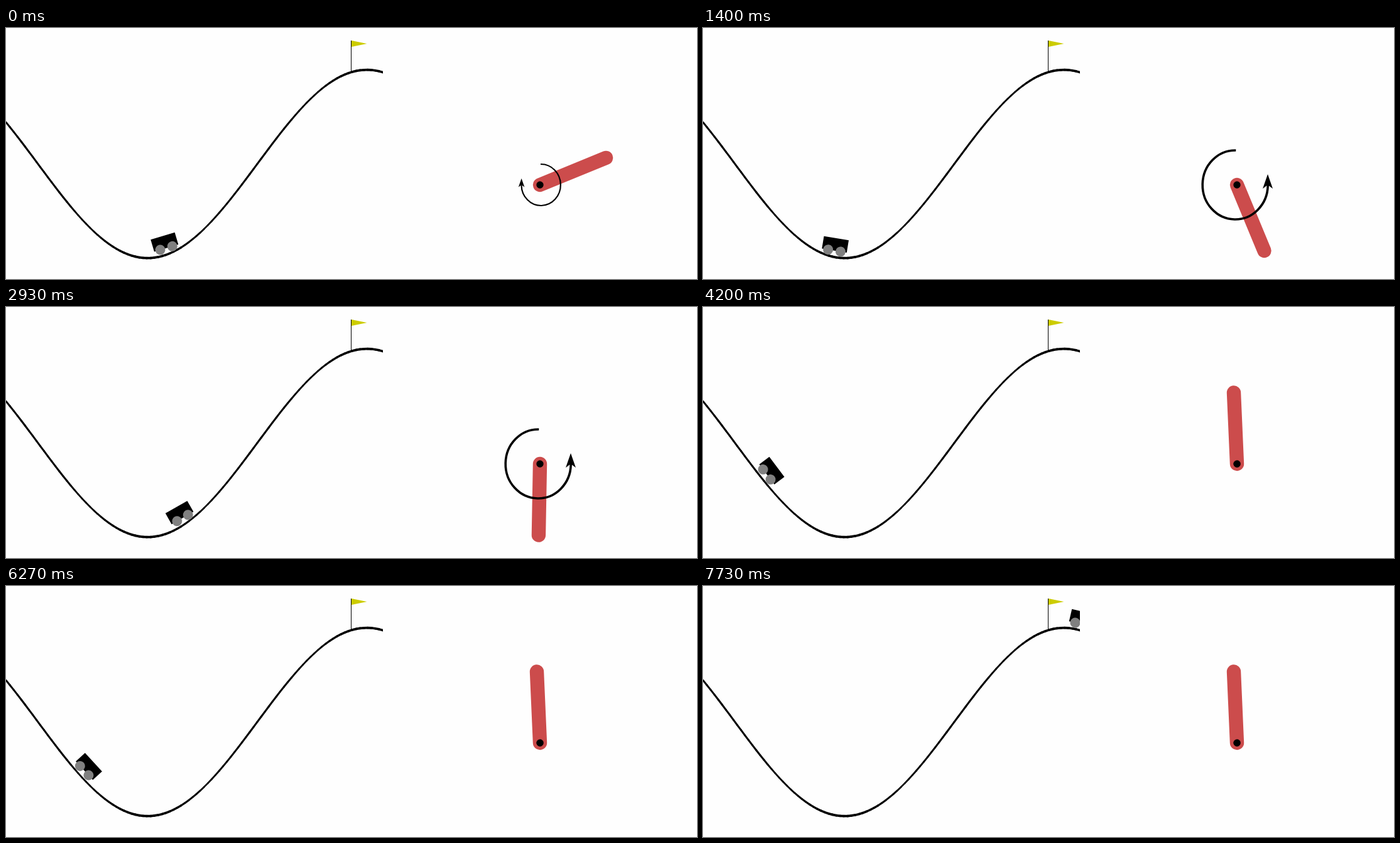
An HTML page with a canvas that plays this animation: 1100x400 px, repeating every 8 s.

```html
<!DOCTYPE html>
<html lang="en">
<head>
<meta charset="utf-8">
<title>Mountain car and pendulum</title>
<style>
  html, body { margin: 0; width: 100%; height: 100%; overflow: hidden; background: #fefefe; }
  canvas { display: block; }
</style>
</head>
<body>
<canvas id="stage" width="1100" height="400"></canvas>
<script>
const ctx = document.getElementById('stage').getContext('2d');
const LOOP = 8000, FPS = 15, SCALE = 1000 / 3, ROD = 113.6;
const COAST = 105, GOAL = 116;

// Turning points of each swing: [tick, value].
const carTurns = [[0, 258], [13.8, 286], [26.5, 155], [44, 286], [62.3, 92.5],
  [78.6, 289], [92, 106], [113, 549]];
const rodTurns = [[0, 1.96], [12.8, -2.5], [27.75, 2.4], [37.5, -1.6], [53.45, Math.PI + .044]];

const smooth = t => t * t * (3 - 2 * t);
const smoother = t => t * t * t * (10 - 15 * t + 6 * t * t);

function swing(turns, k, ease) {
  const i = turns.findIndex(turn => turn[0] > k);
  if (i < 0) return turns[turns.length - 1][1];
  const [k0, a] = turns[i - 1], [k1, b] = turns[i];
  return a + (b - a) * ease((k - k0) / (k1 - k0));
}

// The car pumps itself up, then coasts over the hill to the edge.
function carX(k) {
  const x = swing(carTurns, Math.min(k, COAST), smooth);
  const t = Math.max(0, Math.min(1, (k - COAST) / (GOAL - COAST)));
  return x + (600 - x) * t;
}

const rodAngle = k => swing(rodTurns, k, smoother);

// Push along the swing, harder with time; a light push holds the rod upright.
function torque(k) {
  const i = rodTurns.findIndex(turn => turn[0] > k);
  if (i < 0) return -.1;
  return Math.sign(rodTurns[i][1]) * Math.min(1, .6 + k / 20);
}

const position = x => x / SCALE - 1.2;
const trackY = x => 400 - (.45 * Math.sin(3 * position(x)) + .55) * SCALE;

function polygon(points, color) {
  ctx.fillStyle = color;
  ctx.beginPath();
  points.forEach(p => ctx.lineTo(...p));
  ctx.fill();
}

function disc(x, y, r, color) {
  ctx.fillStyle = color;
  ctx.beginPath();
  ctx.arc(x, y, r, 0, 7);
  ctx.fill();
}

function drawTrack() {
  ctx.strokeStyle = '#000';
  ctx.lineCap = 'round';
  const dx = 600 / 99;
  for (let x = 0; x < 600; x += dx) {
    const y0 = trackY(x), y1 = trackY(x + dx), dy = Math.abs(y1 - y0);
    // The thickness is measured along an axis, so slopes look thinner.
    ctx.lineWidth = 3.8 * Math.max(dx, dy) / Math.hypot(dx, dy);
    ctx.beginPath();
    ctx.moveTo(x, y0);
    ctx.lineTo(x + dx, y1);
    ctx.stroke();
  }
}

function drawCar(x) {
  ctx.save();
  ctx.translate(x, trackY(x));
  ctx.rotate(-Math.cos(3 * position(x)));
  ctx.fillStyle = '#000';
  ctx.fillRect(-20, -30, 40, 20);
  disc(10, -10, 8, '#808080');
  disc(-10, -10, 8, '#808080');
  ctx.restore();
}

function drawFlag() {
  ctx.fillStyle = '#000';
  ctx.fillRect(549, 20, 1, 50);
  polygon([[550, 20], [550, 30], [574.5, 25]], '#cccc00');
}

function drawPendulum(angle, push) {
  ctx.save();
  ctx.translate(850, 250);
  ctx.strokeStyle = '#cc4c4c';
  ctx.lineCap = 'round';
  ctx.lineWidth = 22.4;
  ctx.beginPath();
  ctx.moveTo(0, 0);
  ctx.lineTo(ROD * Math.sin(angle), ROD * Math.cos(angle));
  ctx.stroke();
  disc(0, 0, 5.7, '#000');

  ctx.scale(push, Math.abs(push));
  ctx.strokeStyle = '#000';
  ctx.lineCap = 'butt';
  ctx.lineWidth = 3.6;
  ctx.beginPath();
  ctx.ellipse(-2.8, 0, 52, 55, 0, -1.55, 0, true);
  ctx.stroke();
  polygon([[49, -17], [57, 6], [49, 0], [41, 6]], '#000');
  ctx.restore();
}

function draw(now) {
  const k = Math.floor(now % LOOP * FPS / 1000 + .06);
  ctx.fillStyle = '#fefefe';
  ctx.fillRect(0, 0, 1100, 400);
  ctx.save();
  ctx.beginPath();
  ctx.rect(0, 0, 600, 400);
  ctx.clip();
  drawTrack();
  drawCar(carX(k));
  drawFlag();
  ctx.restore();
  drawPendulum(rodAngle(k), torque(k));
}

const start = performance.now();
function tick() {
  draw(performance.now() - start);
  requestAnimationFrame(tick);
}
tick();
</script>
</body>
</html>
```
